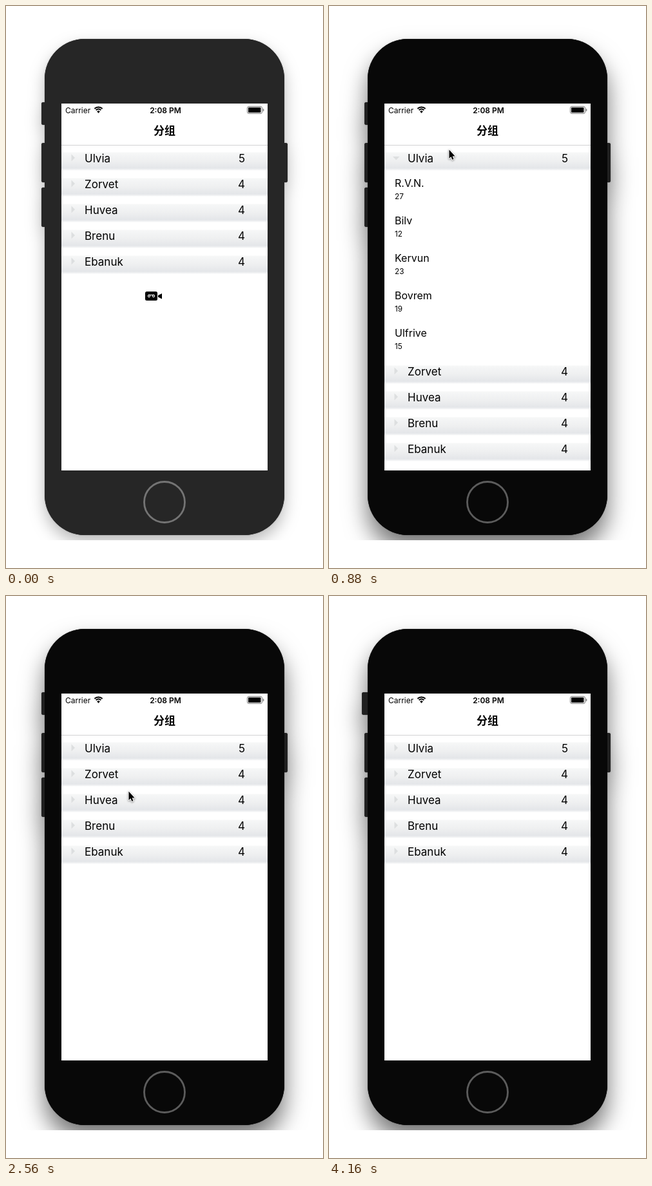
An HTML page with a canvas for the animation above (4.48 s loop, 492 px wide and 870 px high).

```html
<!DOCTYPE html>
<html lang="zh">
<head>
<meta charset="utf-8">
<title>分组</title>
<style>
  html, body { margin: 0; width: 100%; height: 100%; overflow: hidden; background: #fff; }
  canvas { display: block; width: 492px; height: 870px; }
</style>
</head>
<body>
<canvas id="stage" width="492" height="870"></canvas>
<script>
const LOOP = 4480, STEP = 80;
const W = 492, H = 870;
const SANS = 'Inter, "Noto Sans", sans-serif';
const canvas = document.getElementById('stage');
const ctx = canvas.getContext('2d');

const groups = [
  { name: 'Ulvia', open: [560, 1280], people: [['R.V.N.', 27], ['Bilv', 12], ['Kervun', 23], ['Bovrem', 19], ['Ulfrive', 15]] },
  { name: 'Zorvet', open: [1760, 2240], people: [['Hulro', 17], ['Tebzy', 31], ['Firvy', 59], ['Gultik', 23]] },
  { name: 'Huvea', open: [2960, 3200], people: [['Norvek', 26], ['Dulpa', 18], ['Sefrin', 34], ['Otwil', 21]] },
  { name: 'Brenu', people: [1, 2, 3, 4] },
  { name: 'Ebanuk', people: [1, 2, 3, 4] }
];

// Pointer keys: time, x, y
const pointerKeys = [
  [0, 229, 449], [480, 198, 229], [640, 198, 229], [880, 186, 222],
  [1280, 186, 222], [1600, 188, 260], [1840, 188, 260], [1920, 181, 258],
  [2240, 181, 258], [2560, 190, 302], [3680, 190, 302], [4080, 16, 124]
];
const FOCUS_AT = 480, HOVER_AT = 4000, POINTER_GONE = 4160;

function pointerAt(t) {
  for (let i = 1; i < pointerKeys.length; i++) {
    const [t0, x0, y0] = pointerKeys[i - 1], [t1, x1, y1] = pointerKeys[i];
    if (t <= t1) {
      const p = (t - t0) / (t1 - t0);
      return [x0 + (x1 - x0) * p, y0 + (y1 - y0) * p];
    }
  }
  return pointerKeys[pointerKeys.length - 1].slice(1);
}

function roundBox(c, x, y, w, h, r, fill) {
  c.beginPath();
  c.roundRect(x, y, w, h, r);
  c.fillStyle = fill;
  c.fill();
}

function polygon(points, fill) {
  ctx.beginPath();
  points.forEach(([x, y]) => ctx.lineTo(x, y));
  ctx.closePath();
  ctx.fillStyle = fill;
  ctx.fill();
}

function label(text, x, y, font, align = 'left') {
  ctx.font = font;
  ctx.textAlign = align;
  ctx.fillStyle = '#000';
  ctx.fillText(text, x, y);
}

function makePhone(active, hover) {
  const body = document.createElement('canvas');
  body.width = W;
  body.height = H;
  const b = body.getContext('2d');
  const key = active ? '#202020' : '#262626';
  const keyX = hover ? 51 : 55;
  roundBox(b, keyX, 149, 66 - keyX, 35, 3, key);
  roundBox(b, 55, 212, 10, 61, 3, key);
  roundBox(b, 55, 281, 10, 61, 3, key);
  roundBox(b, 427, 212, 10, 61, 3, key);
  roundBox(b, 60, 51, 372, 768, 62, active ? '#080808' : '#262626');
  b.beginPath();
  b.arc(246, 768, 31.5, 0, Math.PI * 2);
  b.lineWidth = 2.8;
  b.strokeStyle = active ? '#5c5c5c' : '#747474';
  b.stroke();

  const phone = document.createElement('canvas');
  phone.width = W;
  phone.height = H;
  const p = phone.getContext('2d');
  p.beginPath();
  p.rect(0, 0, W, 827);
  p.clip();
  const cast = (alpha, blur, dy) => {
    p.shadowColor = `rgba(0,0,0,${alpha})`;
    p.shadowBlur = blur;
    p.shadowOffsetY = dy;
    p.drawImage(body, 0, 0);
  };
  if (active) cast(0.54, 36, 22);
  else cast(0.27, 25, 11);
  cast(0.25, 2, 0);
  return phone;
}

const phones = {
  idle: makePhone(false, false),
  active: makePhone(true, false),
  hover: makePhone(true, true)
};

function drawStatusBar() {
  label('Carrier', 92, 165.5, `12px ${SANS}`);
  label('2:08 PM', 247.5, 165.5, `600 12px ${SANS}`, 'center');

  // Wi-Fi fan
  const a = Math.PI * 0.25;
  ctx.strokeStyle = '#000';
  ctx.lineWidth = 2;
  for (const r of [8.6, 5.4]) {
    ctx.beginPath();
    ctx.arc(143.5, 165, r, -Math.PI + a, -a);
    ctx.stroke();
  }
  ctx.beginPath();
  ctx.moveTo(143.5, 166);
  ctx.arc(143.5, 165.5, 3.2, -Math.PI + a, -a);
  ctx.closePath();
  ctx.fillStyle = '#000';
  ctx.fill();

  // Battery
  ctx.beginPath();
  ctx.roundRect(374.5, 155.5, 23, 11, 2.5);
  ctx.lineWidth = 1;
  ctx.strokeStyle = '#777';
  ctx.stroke();
  roundBox(ctx, 376, 157, 19.5, 8, 1, '#000');
  roundBox(ctx, 398.8, 159, 1.5, 4, [0, 1, 1, 0], '#777');
}

function drawHeader(group, y, open) {
  const g = ctx.createLinearGradient(0, y + 11, 0, y + 40);
  g.addColorStop(0, '#fff');
  g.addColorStop(0.04, '#f6f7f7');
  g.addColorStop(0.5, '#eeeff0');
  g.addColorStop(0.86, '#e4e6e9');
  g.addColorStop(0.93, '#eff0f2');
  g.addColorStop(1, '#fff');
  ctx.fillStyle = g;
  ctx.fillRect(86, y + 11, 320, 29);
  polygon(open
    ? [[99, y + 18], [109.5, y + 18], [104.2, y + 23.5]]
    : [[101.5, y + 14.5], [107, y + 20], [101.5, y + 25.5]], '#dddfe0');
  label(group.name, 122, y + 26.5, `17px ${SANS}`);
  label(group.people.length, 371, y + 26.5, `17px ${SANS}`, 'right');
}

function drawList(t) {
  let y = 215;
  for (const group of groups) {
    const open = group.open && t >= group.open[0] && t < group.open[1];
    drawHeader(group, y, open);
    y += 40;
    if (!open) continue;
    for (const [name, age] of group.people) {
      label(name, 102, y + 25, `16px ${SANS}`);
      label(age, 102, y + 44, `11.8px ${SANS}`);
      y += 58;
    }
  }
}

function drawScreen(t) {
  ctx.save();
  ctx.beginPath();
  ctx.rect(86, 151, 320, 568);
  ctx.clip();
  ctx.fillStyle = '#fff';
  ctx.fillRect(86, 151, 320, 568);
  drawStatusBar();
  label('分组', 246, 199, '600 17px "Noto Sans CJK SC", "Noto Sans CJK", sans-serif', 'center');
  drawList(t);
  ctx.fillStyle = '#d2d2d4';
  ctx.fillRect(86, 215, 320, 1);
  ctx.restore();
}

function drawCamera() {
  roundBox(ctx, 216, 442, 19, 14, 2.5, '#000');
  polygon([[236, 448], [242, 445], [242, 453.5], [236, 450.5]], '#000');
  ctx.strokeStyle = '#fff';
  ctx.lineWidth = 1.1;
  for (const x of [222, 229]) {
    ctx.beginPath();
    ctx.arc(x, 449, 1.6, 0, Math.PI * 2);
    ctx.stroke();
  }
  ctx.beginPath();
  ctx.moveTo(221, 447.3);
  ctx.lineTo(230, 447.3);
  ctx.stroke();
}

function drawPointer(x, y) {
  ctx.save();
  ctx.translate(x, y);
  ctx.beginPath();
  [[0.5, 0.5], [0.5, 14], [3.4, 11.2], [5.3, 15.8], [7.5, 14.9], [5.6, 10.4], [9.6, 10.4]]
    .forEach(([px, py]) => ctx.lineTo(px, py));
  ctx.closePath();
  ctx.lineJoin = 'round';
  ctx.lineWidth = 2;
  ctx.strokeStyle = '#fff';
  ctx.shadowColor = 'rgba(0,0,0,.45)';
  ctx.shadowBlur = 3;
  ctx.shadowOffsetY = 1;
  ctx.stroke();
  ctx.shadowColor = 'transparent';
  ctx.fillStyle = '#000';
  ctx.fill();
  ctx.restore();
}

function draw(t) {
  ctx.fillStyle = '#fff';
  ctx.fillRect(0, 0, W, H);
  const state = t < FOCUS_AT ? 'idle' : t < HOVER_AT ? 'active' : 'hover';
  ctx.drawImage(phones[state], 0, 0);
  drawScreen(t);
  if (t < STEP) drawCamera();
  else if (t < POINTER_GONE) drawPointer(...pointerAt(t));
}

const start = performance.now();
function tick() {
  const t = (performance.now() - start) % LOOP;
  draw(Math.floor(t / STEP) * STEP);
  requestAnimationFrame(tick);
}
tick();
</script>
</body>
</html>
```
